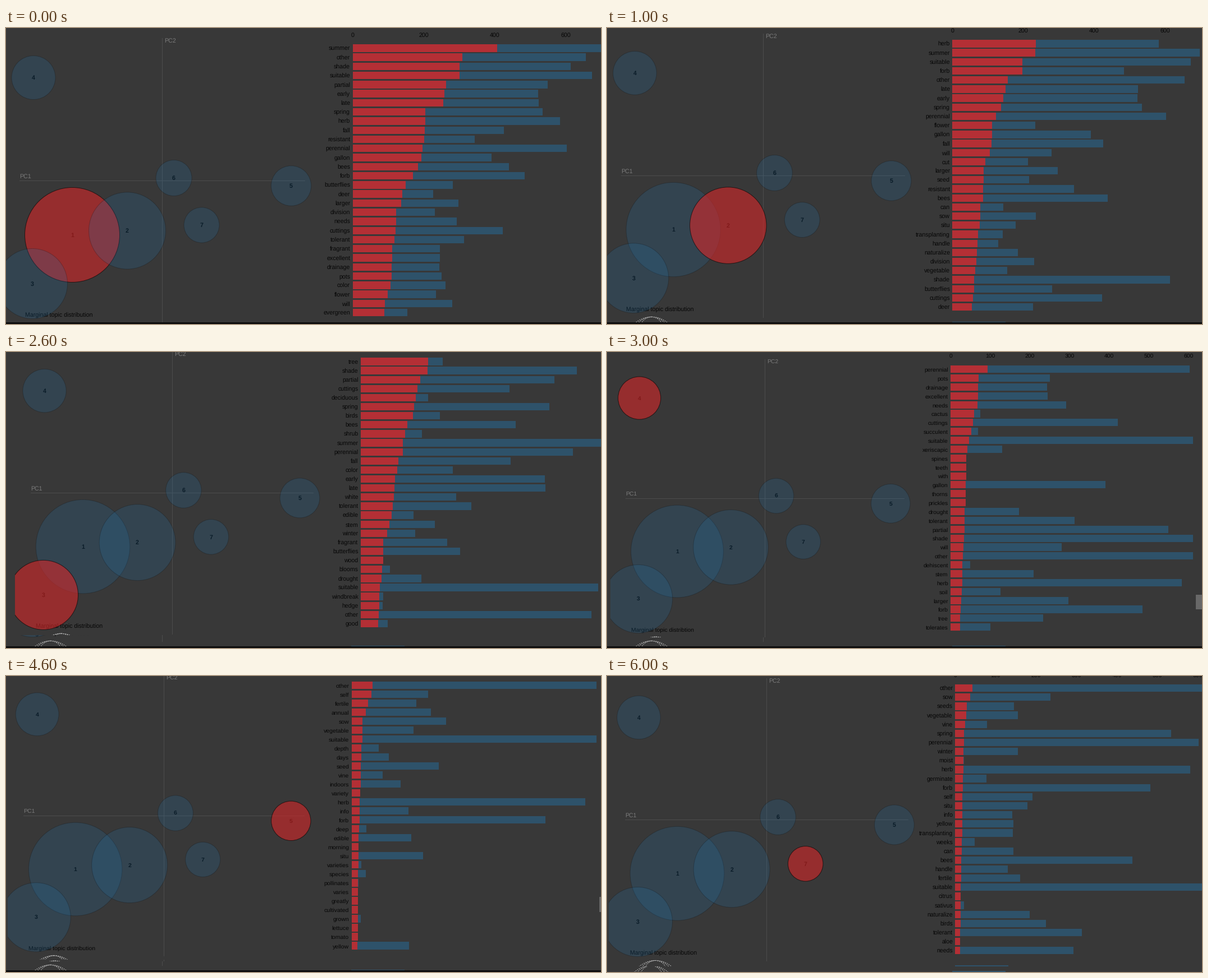
A matplotlib script for the animation above (7 s loop, 1060 px wide and 528 px high).

```python
import matplotlib.pyplot as plt
from matplotlib.animation import FuncAnimation
from matplotlib.patches import Circle, Rectangle

W, H, DPI = 1060, 528, 100
PX = 72 / DPI
BG, INK, AXIS, LABEL = "#383838", "#060606", "#4c4c4c", "#7a7a7a"
BLUE, RED = "#1f77b4", "#d62728"
BAR, BAR_TOPIC = "#2e526a", "#b42f35"
HALF = 254          # half the side of the topic map
BAR_X, BAR_W = 339.5, 443

# Topic circles: x, y from the map centre, radius
TOPICS = [(-160, 97, 84.5), (-62, 89.5, 68.5), (-231, 184, 62.5),
          (-229, -183.5, 39), (230, 9.5, 35.7), (21, -4.5, 32), (70.5, 79.5, 31.5)]

# Overall frequency of each term
TOTAL = {
    "summer": 700, "other": 655, "shade": 613.5, "suitable": 673.5, "partial": 549,
    "early": 522, "late": 523.5, "spring": 534.5, "herb": 582.5, "fall": 426,
    "resistant": 343, "perennial": 602.5, "gallon": 391, "bees": 439, "forb": 483.5,
    "butterflies": 282, "deer": 227, "larger": 297, "division": 231, "needs": 292,
    "cuttings": 422, "tolerant": 313, "fragrant": 245, "excellent": 245,
    "drainage": 244, "pots": 250, "color": 261, "flower": 234, "will": 280,
    "evergreen": 154, "cut": 213, "seed": 217, "can": 144, "sow": 236, "situ": 178,
    "transplanting": 142.5, "handle": 130, "naturalize": 184.5, "vegetable": 154.5,
    "tree": 233, "deciduous": 191, "birds": 224.5, "shrub": 173.5, "white": 270,
    "edible": 149, "stem": 209.5, "winter": 154.5, "wood": 63.5, "blooms": 83,
    "drought": 172.5, "windbreak": 63, "hedge": 62, "good": 76.5, "cactus": 75,
    "succulent": 69.5, "xeriscapic": 129.5, "spines": 40, "teeth": 40, "with": 40,
    "thorns": 38.5, "prickles": 38.5, "dehiscent": 49.5, "soil": 126.5,
    "tolerates": 100.5, "self": 191.5, "fertile": 161, "annual": 198.5, "depth": 68,
    "days": 92.5, "vine": 78, "indoors": 122, "variety": 22, "info": 141.5,
    "deep": 37, "morning": 18, "varieties": 25, "species": 35, "pollinates": 17,
    "varies": 16.5, "greatly": 16.5, "cultivated": 16, "grown": 22.5, "lettuce": 16,
    "tomato": 16, "yellow": 143.5, "start": 111, "vitis": 14.5, "provide": 59,
    "light": 63, "seeds": 145, "moist": 22, "germinate": 77, "weeks": 48.5,
    "citrus": 13, "sativus": 21.5, "aloe": 12,
}

slides = []


def slide(cx, cy, scale, cover, span, step, words, counts, title="distribution"):
    """One topic view: map centre, zoom, painted height, bar range, ticks, terms."""
    slides.append((cx, cy, scale, cover, span, step,
                   list(zip(words.split(), counts)), "Marginal topic " + title))


slide(278, 272, 1, 528, 699, 200,
      "summer other shade suitable partial early late spring herb fall resistant "
      "perennial gallon bees forb butterflies deer larger division needs cuttings "
      "tolerant fragrant excellent drainage pots color flower will evergreen",
      [406, 309, 300.5, 300, 262.5, 258.5, 255.5, 205, 204.5, 203,
       201, 196, 193, 184, 169.5, 149, 139, 136, 122, 121.5,
       120, 117, 112, 111, 110, 110, 106, 98.5, 91.5, 89])
slide(277.5, 263, .9955, 525, 699, 200,
      "herb summer suitable forb other late early spring perennial flower gallon "
      "fall will cut larger seed resistant bees can sow situ transplanting handle "
      "naturalize division vegetable shade butterflies cuttings deer",
      [235, 234, 198, 197, 156, 150, 143.5, 137, 123.5, 112.5,
       112, 109.5, 105.5, 92, 88, 88, 87, 86, 79, 79,
       77.5, 71.5, 70.5, 69.5, 68, 64, 61, 60.5, 58, 55])
slide(295.5, 251, .991, 505, 699, 200,
      "tree shade partial cuttings deciduous spring birds bees shrub summer "
      "perennial fall color early late white tolerant edible stem winter fragrant "
      "butterflies wood blooms drought suitable windbreak hedge other good",
      [190.5, 190, 169, 161.5, 156, 151, 147.5, 131.5, 126, 119.5,
       119, 106.5, 104, 97, 95, 94, 91, 87, 80.5, 75,
       64, 63, 63, 60.5, 59, 55, 52.5, 52, 51, 50])
slide(281, 261, .975, 509, 611, 100,
      "perennial pots drainage excellent needs cactus cuttings succulent suitable "
      "xeriscapic spines teeth with gallon thorns prickles drought tolerant partial "
      "shade will other dehiscent stem herb soil larger forb tree tolerates",
      [94, 71, 70, 70, 68, 59, 57, 52.5, 46.5, 42.5,
       39.5, 39.5, 39.5, 38.5, 38, 38, 35.5, 35, 35, 34,
       32, 31, 30, 29.5, 29, 28.5, 27, 25, 24, 24], "distribtion")
slide(281.2, 249, .985, 506, 611, 100,
      "other self fertile annual sow vegetable suitable depth days seed vine "
      "indoors variety herb info forb deep edible morning situ varieties species "
      "pollinates varies greatly cultivated grown lettuce tomato yellow",
      [52, 49, 40.5, 35, 27.5, 27, 27, 25, 25, 23,
       22.5, 22.5, 21.5, 20, 20, 19.5, 19, 18, 17.5, 17,
       17, 16.5, 16.5, 16, 16, 16, 15.5, 15.5, 15.5, 15])
slide(277, 264, .9965, 528, 611, 100,
      "herb forb annual perennial sow suitable vegetable situ vine needs fertile "
      "self shade partial bees can white handle transplanting start indoors pots "
      "days other vitis provide stem light evergreen cuttings",
      [60, 47, 43.5, 37.5, 37, 35.5, 26, 24.5, 21.5, 21,
       20.5, 20, 19.5, 19, 19, 18, 18, 18, 18, 16.5,
       16.5, 16, 15, 14.5, 14, 13, 13, 12.5, 12.5, 12])
slide(283.7, 256, .992, 518, 611, 100,
      "other sow seeds vegetable vine spring perennial winter moist herb germinate "
      "forb self situ info yellow transplanting weeks can bees handle fertile "
      "suitable citrus sativus naturalize birds tolerant aloe needs",
      [43, 36.5, 28.5, 26.5, 25, 21, 21, 20.5, 20, 19.5,
       19, 18.5, 18, 18, 17, 17, 17, 16.5, 16, 15,
       14, 14, 13.5, 13, 13, 13, 13, 12.5, 12, 12])

plt.rcParams.update({"font.family": "Liberation Sans", "text.hinting": "none",
                     "toolbar": "None"})
fig = plt.figure(figsize=(W / DPI, H / DPI), dpi=DPI, facecolor=BG)
ax = fig.add_axes([0, 0, 1, 1])


class Painter:
    """Draws in map units, back to front, inside one clip box."""

    def __init__(self, cx, cy, scale, cover, order):
        self.cx, self.cy, self.s, self.z = cx, cy, scale, order
        left = max(0, round(cx - 282.5 * scale))
        self.clip = None
        self.add(Rectangle((0, 0), W, cover, fc=BG, lw=0))
        self.clip = Rectangle((left, 0), W - left, cover, transform=ax.transData)

    def add(self, item):
        self.z += 1
        item.set_zorder(self.z)
        ax.add_artist(item)
        if self.clip is not None:
            item.set_clip_path(self.clip)

    def at(self, x, y):
        return self.cx + self.s * x, self.cy + self.s * y

    def rect(self, x, y, w, h, color):
        s = self.s
        self.add(Rectangle(self.at(x, y), w * s, h * s, fc=color, lw=0))

    def line(self, x0, y0, x1, y1):
        (a, b), (c, d) = self.at(x0, y0), self.at(x1, y1)
        self.add(plt.Line2D([a, c], [b, d], color=AXIS, lw=PX))

    def text(self, x, y, s, ha="left", color=INK, weight="normal"):
        px, py = self.at(x, y)
        self.add(plt.Text(px, py, s, ha=ha, va="baseline", color=color,
                          weight=weight, fontsize=10.65 * PX * self.s))

    def disc(self, x, y, r, color, alpha):
        self.add(Circle(self.at(x, y), r * self.s, fc=(color, alpha),
                        ec=("black", alpha), lw=PX))

    def ring(self, x, top, r):
        self.add(Circle(self.at(x, top + r), r * self.s, fill=False, ec="#b4b4b4",
                        lw=PX, ls=(0, (2, 1.5))))


def draw_map(p, chosen, title):
    p.line(-HALF, 0, HALF, 0)
    p.line(0, -HALF, 0, HALF)
    p.text(-HALF, -4, "PC1", color=LABEL)
    p.text(4.5, -246, "PC2", color=LABEL)
    p.text(-244.5, 244, title)
    for r in (44.5, 31.5, 20):
        p.ring(-199, 253.5, r)
    for i, (x, y, r) in enumerate(TOPICS):
        p.text(x, y + 3.8, str(i + 1), "center", weight="bold")
        if i == chosen:
            p.disc(x, y, r, RED, .6)
        else:
            p.disc(x, y, r, BLUE, .2)


def draw_bars(p, span, step, rows):
    unit = BAR_W / span
    for v in range(0, 601, step):
        p.text(BAR_X + v * unit, -256.3, str(v), "center")
    for i, (word, count) in enumerate(rows):
        y = -236.2 + 16.27 * i
        p.text(BAR_X - 4.5, y + 4.4, word, "right")
        p.rect(BAR_X, y - 6.7, min(TOTAL[word], span) * unit, 13.4, BAR)
        p.rect(BAR_X, y - 6.7, count * unit, 13.4, BAR_TOPIC)
    p.rect(BAR_X, 262.5, 95, 15, BAR)


def draw(k):
    ax.clear()
    ax.set(xlim=(0, W), ylim=(H, 0))
    ax.axis("off")
    # Shorter views leave the bottom edge of earlier ones in sight
    first = 0 if k < 5 else 5
    for j in range(first, k + 1):
        cx, cy, scale, cover, span, step, rows, title = slides[j]
        p = Painter(cx, cy, scale, cover, 200 * (j + 1))
        draw_map(p, j, title)
        draw_bars(p, span, step, rows)
        if j == 0:
            p.add(Rectangle((0, 524.5), W, 4, fc="#0d0d0d", lw=0))
    # Scrollbar thumb
    if k == 3:
        p.add(Rectangle((1049, 433), 11, 26, fc="#686868", lw=0))
    elif k == 4:
        p.add(Rectangle((1057, 394), 3, 27, fc="#686868", lw=0))
    return []


anim = FuncAnimation(fig, draw, frames=7, interval=1000, repeat=True,
                     repeat_delay=0, init_func=lambda: [])
plt.show()
```
